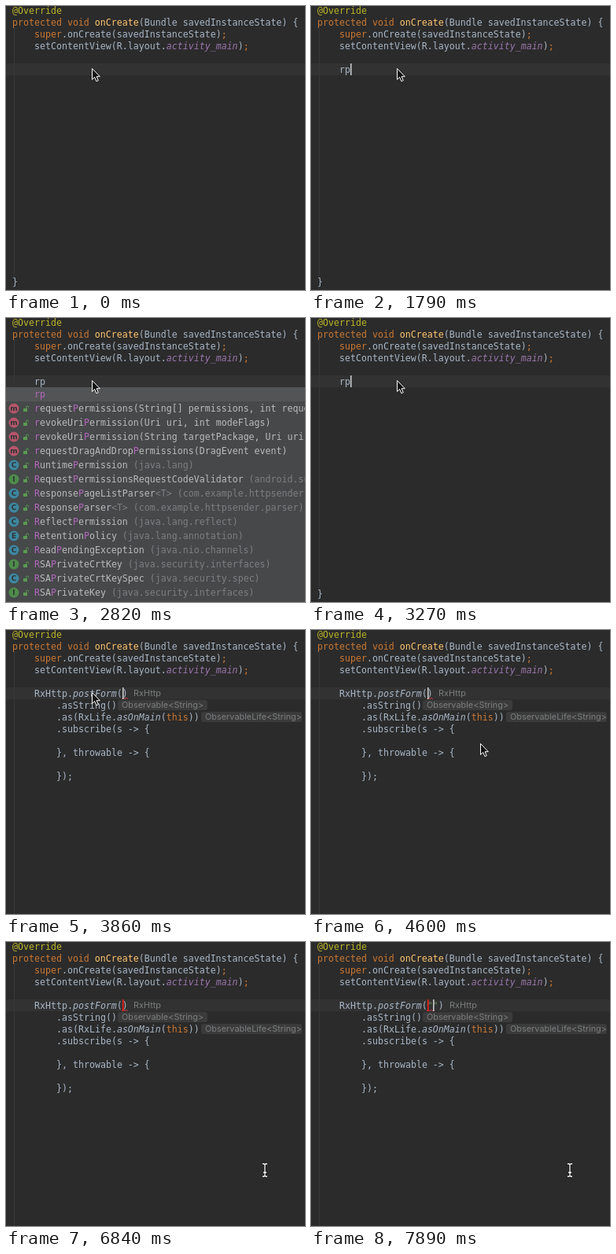
Recreate the animation shown at these times as an HTML page. Size 380 by 361 pixels, loop 8000 ms.

```html
<!DOCTYPE html>
<html lang="en">
<head>
<meta charset="utf-8">
<style>
html, body { margin: 0; width: 100%; height: 100%; overflow: hidden; background: #2b2b2b; }
svg { display: block; width: 380px; height: 361px; }
text { font: 11.628px "DejaVu Sans Mono", monospace; fill: #a9b7c6; white-space: pre; }
.note { fill: #bbb529; }
.key { fill: #cc7832; }
.decl { fill: #ffc66d; }
.field { fill: #9876aa; font-style: italic; }
.static { font-style: italic; }
.str { fill: #6a8759; }
.hit { fill: #b568bd; }
.dim { fill: #7d7f80; }
.item { fill: #bbbbbb; }
text.hint { font: 10.9px Inter, sans-serif; fill: #7b7d7f; }
text.icon { font: bold 9px "DejaVu Sans", sans-serif; fill: #2d3436; text-anchor: middle; }
</style>
</head>
<body>
<svg id="stage" viewBox="0 0 380 361"></svg>
<script>
const LOOP = 8000, CHAR = 7, ROW = 15;
const stage = document.getElementById('stage');

const esc = s => s.replace(/&/g, '&amp;').replace(/</g, '&lt;');
const span = (cls, s) => `<tspan class="${cls}">${esc(s)}</tspan>`;
const text = (x, y, body, cls = '') => `<text x="${x}" y="${y}" class="${cls}">${body}</text>`;
const rect = (x, y, w, h, fill, r = 0) =>
  `<rect x="${x}" y="${y}" width="${w}" height="${h}" rx="${r}" fill="${fill}"/>`;
const colX = col => 8 + col * CHAR;
const code = (row, col, body) => text(colX(col), 10 + row * ROW, body);

// Each track lists [start time, value...]; the latest started entry applies.
const at = (track, t) => track.findLast(step => step[0] <= t);

const SCENE = [[0, 'empty'], [1190, 'r'], [1790, 'rp'], [1930, 'list'], [3270, 'rp'],
  [3410, 'plain'], [3710, 'styled'], [3860, 'hints'], [7890, 'quotes']];
const CARET = [[0, 0], [300, 1], [740, 0], [1190, 1], [2820, 0], [3270, 1], [3710, 1],
  [4750, 0], [5340, 1], [5790, 0], [6240, 1], [6840, 0], [7290, 1], [7740, 0], [7890, 1]];
const POINTER = [[0, 'arrow', 109, 79], [4310, 'arrow', 138, 91], [4460, 'arrow', 187, 116],
  [4600, 'arrow', 215, 144], [4750, 'arrow', 214, 184], [5050, 'arrow', 250, 211],
  [5190, 'arrow', 274, 234], [5340, 'none'], [6690, 'beam', 322, 281], [6840, 'beam', 329, 290]];

const header =
  code(0, 0, span('note', '@Override')) +
  code(1, 0, span('key', 'protected void ') + span('decl', 'onCreate') +
    '(Bundle savedInstanceState) {') +
  code(2, 4, span('key', 'super') + '.onCreate(savedInstanceState)' + span('key', ';')) +
  code(3, 4, 'setContentView(R.layout.' + span('field', 'activity_main') + ')' + span('key', ';'));

// Kind | matched name | argument list or package
const ITEMS = `m|requestPermissions|(String[] permissions, int requestCode)
m|revokeUriPermission|(Uri uri, int modeFlags)
m|revokeUriPermission|(String targetPackage, Uri uri, int modeFlags)
m|requestDragAndDropPermissions|(DragEvent event)
C|RuntimePermission| (java.lang)
I|RequestPermissionsRequestCodeValidator| (android.support.v4.app)
C|ResponsePageListParser|<T> (com.example.httpsender.parser)
C|ResponseParser|<T> (com.example.httpsender.parser)
C|ReflectPermission| (java.lang.reflect)
E|RetentionPolicy| (java.lang.annotation)
C|ReadPendingException| (java.nio.channels)
I|RSAPrivateCrtKey| (java.security.interfaces)
C|RSAPrivateCrtKeySpec| (java.security.spec)
I|RSAPrivateKey| (java.security.interfaces)`.split('\n').map(s => s.split('|'));
const KIND = { m: '#b5566b', C: '#3e869f', I: '#4f8b4b', E: '#3e869f' };

function listItem([kind, name, tail], i) {
  const y = 115 + i * 18, p = name.indexOf('P');
  return `<circle cx="10" cy="${y}" r="6.5" fill="${KIND[kind]}"/>` +
    text(10, y + 3.2, kind, 'icon') +
    rect(22, y, 5, 4, '#5a9a50') +
    `<path d="M25.5 ${y}v-1.5a1.5 1.5 0 0 1 3 0v1" fill="none" stroke="#5a9a50"/>` +
    text(36, y + 4, span('hit', name[0]) + name.slice(1, p) + span('hit', 'P') +
      name.slice(p + 1) + span(kind === 'm' ? 'item' : 'dim', tail), 'item');
}

const popup = rect(0, 88, 380, 273, '#46484a') + rect(0, 88, 380, 18, '#525456') +
  text(36, 101, 'rp', 'hit') + ITEMS.map(listItem).join('');

const hintBox = (x, w, row, label) =>
  rect(x, row * ROW - 1, w, 13, '#3b3b3b', 3) + text(x + 5, row * ROW + 9.3, label, 'hint');

function chain(scene) {
  const styled = scene !== 'plain', quotes = scene === 'quotes';
  const method = s => span(styled ? 'static' : '', s);
  let out = code(5, 4, 'RxHttp.' + method('postForm') + '(' +
      (quotes ? span('str', '""') : '') + ')') +
    code(6, 8, '.asString()') +
    code(7, 8, '.as(RxLife.' + method('asOnMain') + '(' + span('key', 'this') + '))') +
    code(8, 8, '.subscribe(s -> {') +
    code(10, 8, '}, throwable -> {') +
    code(12, 8, '});');
  if (styled) out += '<path d="M147 88l2-2 2 2 2-2 2 2" fill="none" stroke="#bc3f3c"/>';
  if (scene === 'hints' || quotes) {
    out += text(quotes ? 176 : 162, 84.3, 'RxHttp', 'hint') +
      hintBox(142, 114, 6, 'Observable&lt;String>') +
      hintBox(248, 128, 7, 'ObservableLife&lt;String>');
  }
  return out;
}

function pointer([, kind, x, y]) {
  if (kind === 'none') return '';
  const place = `transform="translate(${x} ${y})"`;
  if (kind === 'arrow') {
    return `<path ${place} d="M.5.5v14l3.2-3 2.2 5.2 2.4-1-2.2-5h4.2z" fill="#111" stroke="#fff"/>`;
  }
  const d = 'M-3-8h2l1 1 1-1h2M0-7V7M-3 8h2l1-1 1 1h2M-2 3h4';
  return `<g ${place} fill="none"><path d="${d}" stroke="#111" stroke-width="3"/>` +
    `<path d="${d}" stroke="#fff" stroke-width="1.3"/></g>`;
}

function picture(t) {
  const scene = at(SCENE, t)[1], caretOn = at(CARET, t)[1];
  const expanded = t >= 3410;
  let out = rect(0, 73, 380, 15, '#323232') + rect(10, 28, 1, expanded ? 333 : 315, '#373737') + header;
  if (expanded) {
    out += chain(scene);
    if (scene === 'quotes' || (t >= 4750 && !caretOn)) out += rect(148, 73, 1.5, 15, '#ff1a14');
  } else {
    out += code(5, 4, scene === 'list' ? 'rp' : scene === 'empty' ? '' : scene);
    out += scene === 'list' ? popup : code(23, 0, '}');
  }
  const col = { empty: 4, r: 5, rp: 6, list: 6, quotes: 21 }[scene] ?? 20;
  if (caretOn) out += rect(colX(col), 73, 1.6, 15, '#c8c8c8');
  return out + pointer(at(POINTER, t));
}

let shown = '';
function frame() {
  const next = picture(performance.now() % LOOP);
  if (next !== shown) stage.innerHTML = shown = next;
  requestAnimationFrame(frame);
}
frame();
</script>
</body>
</html>
```
